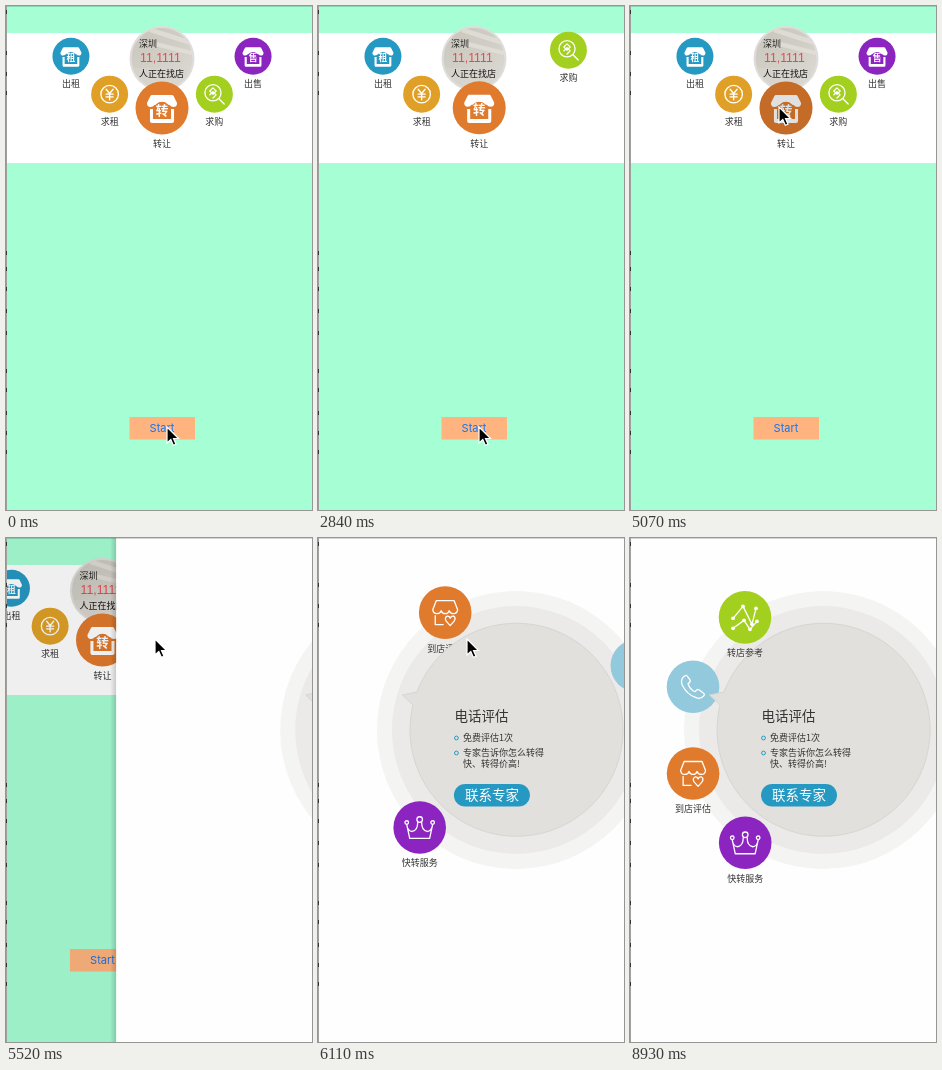
Recreate the animation shown at these times as an HTML page. Size 306 px wide and 504 px high, loop 9030 ms.

```html
<!DOCTYPE html>
<html lang="zh">
<head>
<meta charset="utf-8">
<style>
html, body { margin: 0; width: 100%; height: 100%; overflow: hidden; background: #fff; }
svg { display: block; width: 306px; height: 504px; }
text { font-family: "Noto Sans CJK SC", "Noto Sans CJK", "Noto Sans", sans-serif; }
.line { fill: none; stroke: #fff; stroke-width: 1.3; stroke-linecap: round; stroke-linejoin: round; vector-effect: non-scaling-stroke; }
</style>
</head>
<body>
<svg id="stage" viewBox="0 0 306 504"></svg>
<script>
const LOOP = 9030, TICK = 148.7;

const text = (x, y, size, str, attrs = 'fill="#333"') =>
  `<text x="${x}" y="${y}" font-size="${size}" ${attrs}>${str}</text>`;
const line = d => `<path class="line" d="${d}"/>`;
const dot = (x, y, r) => `<circle cx="${x}" cy="${y}" r="${r}" fill="#fff"/>`;
const ring = (x, y, r) => `<circle class="line" cx="${x}" cy="${y}" r="${r}"/>`;

// Glyphs are drawn around 0,0 inside a disc of radius 26.
const shop = (ch, color) =>
  `<path fill="#fff" d="M-10-13H10Q11-13 11.500-12L15-5Q15-1 11.500-1Q9-1 7.500-3H-7.500Q-9-1-11.500-1Q-15-1-15-5L-11.500-12Q-11-13-10-13Z
   M-12 1H-9V11H9V1H12V13Q12 15 10 15H-10Q-12 15-12 13Z"/>
   <circle cy="2" r="8.200" fill="${color}"/>` +
  text(0, 6.6, 12.5, ch, 'fill="#fff" font-weight="700" text-anchor="middle"');
const yen = ring(0, 0, 12.5) + line('M-5-7L0-1L5-7M0-1V8M-5 0H5M-5 4H5');
const search = ring(-2, -2, 11.5) + line('M6.500 6.500L14 14M-2-9L2.500-4.500L-2 0L-6.500-4.500ZM-6.500 1L-2-3.500L2.500 1L-2 5.500');
const chart = line('M-12 1L-2-11L7 7L11-9M-12 11L-1 3L5 12L12 4') +
  [[-12, 1], [-2, -11], [7, 7], [11, -9], [-12, 11], [-1, 3], [5, 12], [12, 4]].map(p => dot(...p, 1.9)).join('');
const phone = line('M-8-11Q-13-8-11-2Q-6 8 3 11Q8 13 11 9Q12 7 10 6L6 3Q4 2 2 5Q-3 3-5-3Q-2-5-3-7L-6-11Q-7-12-8-11Z');
const store = line('M-9-12H9L12.500-3Q12 1 8.500 1Q5 1 4-2Q3 1 0 1Q-3 1-4-2Q-5 1-8.500 1Q-12 1-12.500-3ZM-10 3V12H-2') +
  line('M5 13L1 8.500Q-1 5 2 3.500Q4 3 5 5.500Q6 3 8.500 3.500Q11 5 9 8.500Z');
const crown = line('M-10 11H10L13-3Q12 4 7.500 4Q2 3 2-5M-10 11L-13-3Q-12 4-7.500 4Q-2 3-2-5') +
  ring(0, -8, 2.8) + ring(-13, -5, 1.8) + ring(13, -5, 1.8);

const BLUE = '#2699c2', ORANGE = '#e07a2d', PURPLE = '#8c24c0', LIME = '#a3d01e';

// Each fan swings its icons one after another around a centre.
const fans = [
  { x: 156, y: -4, r: 106, from: -40, to: 149.2, gap: -29.6, start: 13.9, icons: [
    { color: BLUE, size: 18.5, label: '出租', glyph: shop('租', BLUE) },
    { color: '#e0a027', size: 18.5, label: '求租', glyph: yen },
    { color: ORANGE, size: 26.5, label: '转让', glyph: shop('转', ORANGE) },
    { color: LIME, size: 18.5, label: '求购', glyph: search },
    { color: PURPLE, size: 18.5, label: '出售', glyph: shop('售', PURPLE) } ] },
  { x: 193, y: 192, r: 137, from: 360, to: 124.6, gap: 36.9, start: 38.05, icons: [
    { color: PURPLE, size: 26.3, label: '快转服务', glyph: crown },
    { color: ORANGE, size: 26.3, label: '到店评估', glyph: store },
    { color: '#93c9dc', size: 26.3, label: '', glyph: phone },
    { color: LIME, size: 26.3, label: '转店参考', glyph: chart } ] }
];

const iconMarkup = (icon, id) => `<g id="${id}">
  <circle r="${icon.size}" fill="${icon.color}"/>
  <g transform="scale(${icon.size / 26.4})">${icon.glyph}</g>
  ${text(0, icon.size + 12.6, 9, icon.label, 'fill="#333" text-anchor="middle"')}</g>`;
const fanMarkup = n => fans[n].icons.map((icon, i) => iconMarkup(icon, `icon${n}${i}`));

const homePage = `
  <rect x="-10" width="330" height="504" fill="#a6ffd4"/>
  <rect x="-10" y="27" width="330" height="130" fill="#fff"/>
  <circle cx="156" cy="52.500" r="32.500" fill="#dedddb"/>
  <g clip-path="url(#round)">
    <rect x="123" y="20" width="66" height="66" fill="url(#photo)"/>
    <path d="M146 22L190 36V41L143 26ZM150 36L190 46V50L148 40Z" fill="#e6e3dc" opacity=".7"/>
    <path d="M123 62H190V86H123Z" fill="#d9d6cf" opacity=".6"/>
  </g>
  ${text(133, 40.5, 9, '深圳', 'fill="#222"')}
  ${text(134, 55.5, 12.3, '11,1111', 'fill="#e5484d" style="font-family:\'Liberation Sans\',Arial,sans-serif"')}
  ${text(133, 70.5, 9, '人正在找店', 'fill="#111" font-weight="500"')}
  <rect x="123.500" y="411" width="65.500" height="22.500" fill="#ffb47f"/>
  ${text(156, 426.3, 11, 'Start', 'id="start" fill="#1776ee" text-anchor="middle" style="font-family:Inter,Roboto,sans-serif"')}
  ${fanMarkup(0).join('')}
  <circle id="press" cx="156" cy="102" r="26.500" opacity=".12"/>`;

const bullet = y => `<circle cx="133.500" cy="${y}" r="1.900" fill="none" stroke="${BLUE}"/>`;
const [crownIcon, storeIcon, phoneIcon, chartIcon] = fanMarkup(1);
const dialPage = `
  <rect x="-6" width="6" height="504" fill="url(#shade)"/>
  <rect width="320" height="504" fill="#fefefe"/>
  <g id="dial">
    <circle cx="193" cy="192" r="139" fill="#f4f4f3"/>
    <circle cx="193" cy="192" r="124" fill="#ebeae8"/>
    ${crownIcon}${storeIcon}${phoneIcon}
    <path d="M94 154L79.500 157L90 167A106.500 106.500 0 1 0 94 154Z" fill="#e1e0dc" stroke="#d6d5d1"/>
    ${chartIcon}
    ${text(131.5, 183.3, 13.5, '电话评估')}
    ${bullet(200)}${text(140, 203.3, 9, '免费评估1次')}
    ${bullet(215)}${text(140, 218.3, 9, '专家告诉你怎么转得')}
    ${text(140, 228.8, 9, '快、转得价高!')}
    <rect x="131" y="246" width="76" height="22.500" rx="11.250" fill="${BLUE}"/>
    ${text(142, 262.2, 13.5, '联系专家', 'fill="#fff"')}
  </g>`;

const ticks = [6, 47, 68, 87, 247, 263, 283, 305, 327, 365, 384, 407, 427, 446]
  .map(y => `M0 ${y - 2}h1v4h-1z`).join('');

document.getElementById('stage').innerHTML = `
  <defs>
    <clipPath id="round"><circle cx="156" cy="52.500" r="30.500"/></clipPath>
    <linearGradient id="photo" x2=".6" y2="1">
      <stop stop-color="#c9c6bd"/><stop offset=".5" stop-color="#d0cdc5"/><stop offset="1" stop-color="#dcdad4"/>
    </linearGradient>
    <linearGradient id="shade"><stop stop-opacity="0"/><stop offset="1" stop-opacity=".16"/></linearGradient>
  </defs>
  <g id="home">${homePage}</g>
  <rect id="dim" width="306" height="504"/>
  <g id="next">${dialPage}</g>
  <path d="M0 0H306V1H0Z" fill="#000" opacity=".16"/>
  <path d="M0 0H1V504H0Z" fill="#a0a0a0"/>
  <path d="${ticks}" fill="#333"/>
  <path id="cursor" d="M0 0V16L3.800 12.500L6.300 18.300L9 17.200L6.500 11.500H11.500Z" stroke="#fff" stroke-width="1.200"/>`;

const el = id => document.getElementById(id);
const move = (id, x, y = 0) => el(id).setAttribute('transform', `translate(${x} ${y})`);
const show = (id, on) => el(id).setAttribute('visibility', on ? 'inherit' : 'hidden');
const clamp = v => Math.min(1, Math.max(0, v));
const ease = u => (1 - Math.cos(Math.PI * clamp(u))) / 2;

function placeFan(n, k) {
  const fan = fans[n];
  fan.icons.forEach((icon, i) => {
    const u = (k - fan.start - i * 1.01) / 3.4;
    const end = fan.to + i * fan.gap;
    const angle = (fan.from + (end - fan.from) * ease(u)) * Math.PI / 180;
    show(`icon${n}${i}`, u > 0);
    move(`icon${n}${i}`, fan.x + fan.r * Math.cos(angle), fan.y + fan.r * Math.sin(angle));
  });
}

function cursorAt(k) {
  if (k < 50) {
    const e = 1 - (1 - clamp((k - 23) / 6)) ** 2.84;
    return [161 - 12 * e + 143 * e * e * (1 - e), 421 - 320 * e];
  }
  const e = clamp((k - 49) / 8) ** 1.3;
  return [149 + 122 * e, 101 + 410 * e];
}

function draw(time) {
  const k = Math.floor(time % LOOP / TICK);
  placeFan(0, k < 14 ? 30 : k);
  placeFan(1, k);
  el('start').setAttribute('opacity', k >= 2 && k < 15 ? .25 : 1);
  show('press', k >= 34 && k < 37);

  const push = k < 37 ? 0 : 1 - .36 ** ((k - 36) ** 1.6);
  move('home', -93 * push);
  el('dim').setAttribute('opacity', .1 * push);
  show('next', push > 0);
  move('next', k > 39 ? 0 : 306 * (1 - push));
  move('dial', k > 43 ? 0 : 110 * .46 ** (k - 37));

  move('cursor', ...cursorAt(k));
  show('cursor', k < 57);
}

const begin = performance.now();
(function frame() {
  draw(performance.now() - begin);
  requestAnimationFrame(frame);
})();
</script>
</body>
</html>
```
